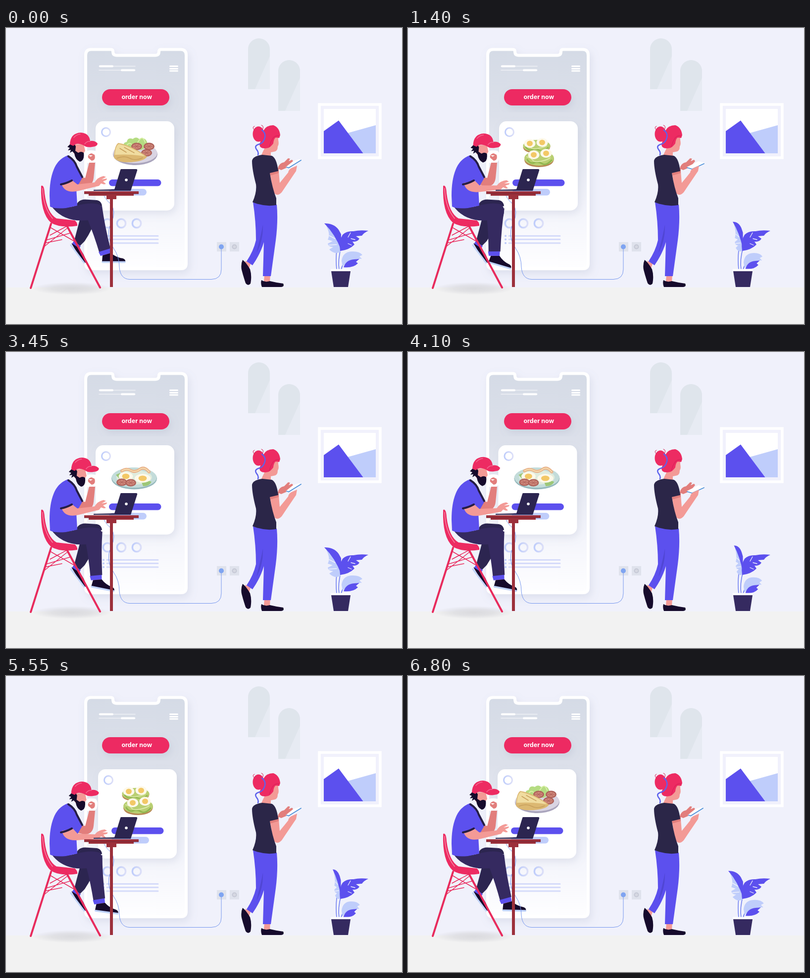
An HTML page for the animation above (6.85 s loop, 800x600 px).

```html
<!DOCTYPE html>
<html lang="en">
<head>
<meta charset="utf-8">
<title>Order now</title>
<style>
html, body { margin: 0; width: 100%; height: 100%; overflow: hidden; background: #f0f1fb; }
svg { display: block; width: 800px; height: 600px; }
.blue { fill: #5c50ee; } .pale { fill: #bfcdfb; } .red { fill: #ed2b62; }
.navy { fill: #2c2550; } .shirt { fill: #2b2648; } .pants { fill: #352a60; } .black { fill: #160b2c; }
.skin { fill: #f39a96; } .shade { fill: #e27e7c; } .white { fill: #fff; }
.line { fill: none; stroke-linecap: round; stroke-linejoin: round; }
</style>
</head>
<body>
<svg viewBox="0 0 800 600">
<defs>
  <linearGradient id="screen" x1="0" y1="0" x2="0" y2="1">
    <stop offset="0" stop-color="#d5dbe6"/><stop offset=".3" stop-color="#dce0ea"/>
    <stop offset=".72" stop-color="#f3f4fb"/><stop offset="1" stop-color="#fefeff"/>
  </linearGradient>
  <linearGradient id="ringFill"><stop stop-color="#bfcdfb"/><stop offset="1" stop-color="#dcdff8"/></linearGradient>
  <radialGradient id="ground"><stop stop-color="#dadade"/><stop offset=".5" stop-color="#dadade" stop-opacity=".7"/><stop offset="1" stop-color="#dadade" stop-opacity="0"/></radialGradient>
  <filter id="soft" x="-30%" y="-30%" width="160%" height="170%"><feDropShadow dx="4" dy="7" stdDeviation="8" flood-color="#8088a8" flood-opacity=".17"/></filter>
  <clipPath id="inside"><rect x="163" y="60" width="198" height="424"/></clipPath>
  <clipPath id="chat"><rect x="555" y="226" width="65" height="42"/></clipPath>
  <g id="arch">
    <path fill="#dfe5ec" d="M0 103V22A22 22 0 0 1 44 22V103Z"/>
    <path fill="#e7ebf3" d="M44 36V103H14Z"/>
  </g>
  <g id="frame">
    <rect class="white" x="181" y="189" width="159" height="181" rx="15" filter="url(#soft)"/>
    <circle class="line" cx="202" cy="211" r="8.5" stroke="url(#ringFill)" stroke-width="3"/>
    <rect class="blue" x="208" y="307" width="105.500" height="13.500" rx="6.700"/>
    <rect class="pale" x="208" y="326" width="76" height="13.500" rx="6.700"/>
  </g>
  <g id="egg">
    <ellipse rx="11.500" ry="9" fill="#fdf9ea"/>
    <ellipse rx="6" ry="5.500" fill="#f3c866"/>
  </g>
  <g id="tomato">
    <ellipse rx="11" ry="7.500" fill="#ad6159"/><ellipse rx="8.500" ry="5.300" fill="#cd8578"/>
    <path class="line" stroke="#ad6159" d="M-7 0H7M-4 -4L4 4M4 -4L-4 4"/>
  </g>
  <g id="toast">
    <path fill="#b88955" d="M-30 2Q-30 17 0 18Q30 17 30 0Z"/>
    <ellipse rx="30" ry="15" fill="#b9cf72"/>
    <path class="line" stroke="#90b64f" stroke-width="3" d="M-24 3Q-18 12 -10 9T6 11T25 4"/>
    <path class="line" stroke="#dce9a8" stroke-width="2" d="M-25 -3Q-16 -1 -13 4T4 6T22 -1"/>
  </g>
</defs>

<rect width="800" height="600" fill="#f0f1fb"/>
<rect y="526" width="800" height="74" fill="#f2f2f2"/>
<ellipse cx="133" cy="528" rx="80" ry="13" fill="url(#ground)"/>
<use href="#arch" x="489" y="21"/><use href="#arch" x="550" y="65"/>

<rect x="633" y="155" width="123" height="108" fill="#f1f1fc" stroke="#fff" stroke-width="5.500"/>
<rect class="white" x="642" y="164" width="105" height="90"/>
<path class="pale" d="M690 213L747 197V254H700Z"/>
<path class="blue" d="M642 209L672 187.500L721.500 254H642Z"/>

<!-- phone -->
<path filter="url(#soft)" fill="url(#screen)" stroke="#fff" stroke-width="6" d="M172 43.500H212Q216 43.500 216 48Q216 55.500 224 55.500H301Q309 55.500 309 48Q309 43.500 313 43.500H353Q364 43.500 364 55V477Q364 488 353 488H172Q161 488 161 477V55Q161 43.500 172 43.500Z"/>
<g class="line" stroke="#fff">
  <path stroke-width="1.500" opacity=".6" d="M188 77.500H261M188 85.500H261"/>
  <path stroke-width="4" d="M190 77.500H215M234 85.500H259"/>
  <path stroke-width="3" d="M331.500 77.500H346.500M331.500 82.500H346.500M331.500 87H346.500"/>
</g>
<rect class="red" x="194" y="124" width="136" height="33" rx="16.500" filter="url(#soft)"/>
<text x="264.300" y="144" text-anchor="middle" fill="#fff" font-family="Inter, 'Open Sans', sans-serif" font-weight="700" font-size="12.500">order now</text>

<g clip-path="url(#inside)">
  <g class="line" stroke="url(#ringFill)" stroke-width="3.500">
    <circle cx="205" cy="396" r="8.700"/><circle cx="233" cy="396" r="8.700"/><circle cx="264" cy="396" r="8.700"/>
  </g>
  <path class="line" stroke="#d5dbfa" stroke-width="3" d="M204 421.500H307M204 428.500H307M204 436H307"/>
  <path class="line" stroke="#bdcafb" stroke-width="4" d="M197 421.500h.1M197 428.500h.1M197 436h.1"/>

  <g id="card0"><use href="#frame"/>
    <ellipse cx="261" cy="256" rx="45" ry="22" fill="#aaa5bd"/>
    <ellipse cx="261" cy="253.500" rx="44.500" ry="20.500" fill="#d9d4e2"/>
    <path fill="#b5dc82" d="M239 245Q234 232 244 231Q246 221 256 225Q263 219 269 225Q280 221 284 229Q290 240 274 247Z"/>
    <path class="line" stroke="#d9f0a7" stroke-width="2" d="M243 240Q248 230 254 236T268 229T281 232"/>
    <use href="#tomato" x="264" y="240"/><use href="#tomato" x="289" y="240"/><use href="#tomato" x="284" y="253"/>
    <path fill="#dcb872" d="M218 262Q219 238 227 233Q255 238 285 261Q276 273 239 272Q222 270 218 262Z"/>
    <path fill="#f0dca0" d="M220 257Q221 239 228 235Q255 241 281 260Q250 255 220 257Z"/>
    <path class="line" stroke="#c79f5c" stroke-width="1.500" d="M224 264Q239 258 250 264T276 263M230 244L243 252M239 242L259 253"/>
  </g>
  <g id="card1"><use href="#frame"/>
    <use href="#toast" transform="translate(257 239) scale(.92 .82)"/>
    <use href="#egg" x="243" y="234"/><use href="#egg" x="268" y="232"/>
    <use href="#toast" transform="translate(262 264)"/>
    <use href="#egg" x="251" y="257"/><use href="#egg" x="276" y="254"/>
  </g>
  <g id="card2"><use href="#frame"/>
    <ellipse cx="259" cy="256.500" rx="46" ry="22" fill="#96b9bd"/>
    <ellipse cx="259" cy="254.500" rx="45.500" ry="20.500" fill="#c3dcda"/>
    <ellipse cx="259" cy="254" rx="36" ry="15" fill="#e0ecdd"/>
    <path class="line" stroke="#e9b28a" stroke-width="6" d="M234 241Q243 235 252 240T270 238T289 243"/>
    <path class="line" stroke="#f6dfb1" stroke-width="2" d="M234 241Q243 235 252 240T270 238T289 243"/>
    <path fill="#9cc777" d="M274 264Q282 258 294 263Q290 272 277 272ZM222 249L231 245L229 257Z"/>
    <use href="#egg" transform="translate(242 252) scale(1.250 1)"/><use href="#egg" transform="translate(276 256) scale(1.400 1)"/>
    <use href="#tomato" x="234" y="264"/><use href="#tomato" x="252" y="265"/>
  </g>
</g>

<!-- sockets -->
<g fill="#dfe2ec"><rect x="426" y="434" width="19" height="19"/><rect x="452" y="434" width="19" height="19"/></g>
<circle cx="461.500" cy="443.500" r="5" fill="#c5c8d5"/><circle cx="461.500" cy="443.500" r="3" fill="#d6d8e2"/>

<!-- plant -->
<path class="line" stroke="#6c7cf0" stroke-width="1.500" d="M668 490Q666 470 668 450M673 490Q670 470 677 445M677 490Q680 475 695 468"/>
<g id="leaf">
  <path class="pale" d="M647 401Q656 418 650 429L660 432L650 437Q651 444 661 444L653 449Q664 460 676 454Q678 432 671 415Z"/>
  <path class="line" stroke="#f0f1fb" stroke-width="1.500" d="M653 421L665 427M653 440L668 439M656 409L664 415"/>
  <path class="blue" d="M643 396Q663 396 672 409L677 418V450Q665 418 643 396Z"/>
</g>
<path class="blue" d="M675 452Q672 431 680 419Q688 411 702 412Q715 409 732 411Q723 415 719 421L707 422L714 427Q710 434 700 433L704 439Q693 450 675 452Z"/>
<path class="line" stroke="#f0f1fb" stroke-width="1.300" d="M696 415L691 424M705 429L697 427M698 440L691 437"/>
<g id="sprig">
  <path class="pale" d="M678 472Q680 454 698 453Q714 452 720 460L714 463L719 468Q700 466 680 483Z"/>
  <path class="blue" d="M682 485Q687 470 703 469L714 468L707 474L711 477Q701 487 682 485Z"/>
</g>
<path class="pants" d="M657 493H696L691 525H662Z"/><path class="white" d="M656 488.500H696V493H656Z"/>

<!-- woman -->
<g clip-path="url(#chat)"><rect id="pill" class="blue" x="563.500" width="47.500" height="23" rx="11.500"/></g>
<path class="skin" d="M484 472L494 478L491 488L481 480ZM522 500H534L533 514H521ZM515 259L528 232L542 221Q551 219 550 227Q552 236 549 240Q549 251 540 251L535 252L535 259Z"/>
<path class="black" d="M478 470Q485 475 493 489Q497 502 494 518Q489 524 484 517Q479 502 476 490Q474 479 478 470ZM516 511Q523 516 533 513Q545 516 560 518Q563 524 556 525H517Q514 518 516 511Z"/>
<path class="blue" d="M499 353Q522 362 547 358Q550 390 545 430L535 503H519L521 434Q514 458 498 481L486 473Q500 452 505 430Q505 392 499 353Z"/>
<path fill="#5046d4" d="M519 399Q520 432 506 455Q514 425 519 399Z"/>
<path class="shade" d="M549 285Q551 274 562 272L570 264L574 265L571 270L578 267L580 270L570 282L556 288Z"/>
<path class="white" id="device"/><path id="edge" class="line" stroke="#4b8fd8" stroke-width="1.800"/>
<path class="skin" d="M533 293L551 290L553 314L570 293Q571 286 579 283L588 279L586 290L557 333Q548 343 540 333Z"/>
<path class="shade" d="M532 288L551 284V294L534 299Z"/>
<path class="shirt" d="M497 269Q499 259 518 257L537 259Q547 264 550 290L533 294Q538 325 546 345V359Q522 363 498 353Q507 333 505 317Q497 287 497 269Z"/>
<path class="red" d="M520 208Q526 197 540 197Q552 201 554 217L552 223L545 222Q541 224 540 234Q535 241 530 243Q513 247 512 236Q517 223 520 208Z"/>
<ellipse class="red" cx="510" cy="215" rx="11.500" ry="15.500"/>
<path class="line" stroke="#d31f55" d="M502 207Q496 201 502 199M518 207Q522 198 516 197M532 240Q535 229 540 222Q547 216 552 219"/>
<path class="line" stroke="#5c62ed" stroke-width="2.500" d="M517 207Q525 213 523 222Q520 234 510 236Q501 239 506 246Q511 252 509 257"/>

<!-- chair -->
<path class="red" d="M71 320Q77 317 78 335Q83 375 102 386L139 390Q145 395 144 401Q110 406 91 395Q69 375 71 320Z"/>
<path class="line" stroke="#f58aa7" stroke-width="1.500" d="M74 325Q75 363 94 386"/>

<!-- seated man -->
<path class="white" d="M159 253Q164 246 181 249Q188 255 183 269Q175 279 163 273Z"/>
<path class="shade" d="M143 300L160 304L168 273L180 273L177 304Q175 321 159 321L140 317ZM166 263Q164 256 173 254L179 257Q182 268 173 269Z"/>
<path class="white" d="M167 258L175 258L171 261Z"/>
<path class="navy" d="M150 385L184 380Q175 408 159 432L149 442L137 434Z"/>
<path class="blue" d="M137 432L151 442L147 448L133 438Z"/>
<path class="black" d="M132 436L146 445Q155 454 159 464L161 476L154 473Z"/>
<path class="line" stroke="#bfd3fb" stroke-width="3" d="M131 440L158 476"/>
<path class="navy" d="M141 364Q143 348 160 347.500L184 349Q193 351 194 361Z"/>
<g id="shin">
  <path class="pants" d="M156 366L194 361Q199 399 211 447L189 457Q178 420 166 391Z"/>
  <path class="skin" d="M193 455L210 451L213 462L196 464Z"/>
  <path class="blue" d="M187 454L210 447L212 456L191 462Z"/>
  <path class="black" d="M195 461L212 456Q222 465 236 467Q242 469 241 474H194Z"/>
  <path class="line" stroke="#bfd3fb" stroke-width="3.500" d="M195 474.500H240"/>
</g>
<path class="pants" d="M91 360Q115 368 142 360Q174 352 189 358Q198 367 191 385Q176 391 143 390Q109 386 91 360Z"/>
<path class="blue" d="M125 258Q104 266 96 288Q88 308 88 340L89 362Q98 367 121 365L144 360L142 325L154 304Q147 276 126 259Z"/>
<path class="line" stroke="#251d45" stroke-width="4" d="M126 260Q139 268 143 281L154 302"/>
<g id="arm">
  <path class="skin" d="M112 316L134 309L144 317L179 313Q184 303 197 300L202 302L193 307L204 305L203 308L196 311L202 316L198 317L192 315L188 320L147 330Q119 337 112 316Z"/>
</g>
<path class="line" stroke="#251d45" stroke-width="4" d="M111 317Q122 315 133 309"/>
<g id="head">
  <path class="skin" d="M137 236L157 235L160 249L154 258L143 260L136 253Z"/>
  <path class="black" d="M130 235L138 235L141 240L140 249L146 253Q152 249 157 253Q159 269 149 271Q140 267 138 254L134 250L129 253L131 247L125 248L129 243L124 241Z"/>
  <path class="red" d="M129 236Q130 213 151 212Q168 213 170 229Q180 228 185 234Q185 240 174 241Q163 243 157 238Q143 231 136 239Z"/>
  <path class="line" stroke="#f36a91" stroke-width="1.500" d="M137 222Q142 216 150 215M159 235Q164 229 170 230"/>
</g>

<g class="line" stroke="#e82b5d" stroke-width="4">
  <path d="M91 397L50 527M122 399L190 526"/>
  <path stroke-width="1.500" d="M89 404L141 434M81 430L132 415M76 444L126 404M89 420L126 400M78 436L113 429"/>
</g>
<path class="line" stroke="#7697ee" d="M198 340Q203 350 211 356Q224 372 212 396Q200 421 217 446Q229 463 229 485Q231 509 250 509.500H415Q435 509 435 489V444"/>
<circle cx="435" cy="443.500" r="5" fill="#7fa4f1"/>

<!-- table and laptop -->
<path fill="#9c303b" d="M158 331H268V336H158ZM167 336H258V340H167ZM203 340H223V347H203ZM210 347H216V525H210Z"/>
<path fill="#7d2431" d="M158 335H268V336.500H158Z"/>
<path class="navy" d="M233 286H263Q266 286 265 289L252 330H177V328L219 327L231 288Q231 286 233 286Z"/>
<circle class="white" cx="243" cy="308" r="2.800"/>
</svg>
<script>
const $ = id => document.getElementById(id);
const LOOP = 6850, STEP = 50, GAP = 240;

// Smooth curve through [time, value] pairs, without overshoot.
function curve(keys) {
  const rate = i => (keys[i + 1][1] - keys[i][1]) / (keys[i + 1][0] - keys[i][0]);
  const slope = keys.map((_, i) => {
    if (!i || i === keys.length - 1) return 0;
    const a = rate(i - 1), b = rate(i);
    return a * b > 0 ? 2 * a * b / (a + b) : 0;
  });
  return t => {
    if (t <= keys[0][0]) return keys[0][1];
    const i = keys.findIndex(k => k[0] >= t) - 1;
    if (i < 0) return keys[keys.length - 1][1];
    const [t0, a] = keys[i], [t1, b] = keys[i + 1], d = t1 - t0, u = (t - t0) / d;
    const s = u * u * (3 - 2 * u), v = 1 - u;
    return a + (b - a) * s + d * u * v * (slope[i] * v - slope[i + 1] * u);
  };
}

const slide = curve([[0, 0], [250, 6], [400, 20], [500, 41], [600, 150], [700, GAP - 9], [800, GAP - 5], [900, GAP - 3], [1150, GAP]]);
const shin = curve([[0, 0], [50, 1.5], [650, 25], [1150, 3], [1300, 7.5], [1400, 16.5], [1750, 32], [2250, 34], [2450, 25.5], [3000, 4], [3425, 11.5]]);
const arm = curve([[0, 0], [300, 0], [550, 8], [800, 2], [1150, 8], [1300, 9], [1400, 7], [1750, 1], [2250, 7.5], [2450, 9], [2900, 2], [3150, 6], [3400, 0]]);
const leafTip = curve([[0, 643], [50, 647], [350, 660], [800, 644], [1300, 660], [1400, 656], [1800, 643], [2250, 650], [2450, 656], [2650, 660], [3050, 648], [3400, 643]]);
const pillTop = curve([[1950, 270], [2250, 230], [2450, 220], [2750, 202]]);

const set = (id, value) => $(id).setAttribute("transform", value);

function draw(time) {
  const t = Math.floor(time % LOOP / STEP) * STEP;
  const m = Math.min(t, LOOP - t); // plays forward, then back

  const shift = slide(m - 500) + slide(m - 1750);
  for (let i = 0; i < 3; i++) set("card" + i, `translate(${i * GAP - shift} 0)`);

  const nod = (1 - Math.cos(m / LOOP * 6 * Math.PI)) / 2;
  set("head", `translate(${2.8 * nod} ${2 * nod})`);
  set("shin", `rotate(${shin(m)} 178 366)`);
  set("arm", `rotate(${arm(m)} 128 321)`);

  const k = (676 - leafTip(m)) / 33;
  set("leaf", `translate(676 ${-8 * (1 - k)}) scale(${k} 1) translate(-676 0)`);
  set("sprig", `translate(678 0) scale(${.76 + .24 * k} 1) translate(-678 ${8 * (1 - k)})`);

  $("pill").setAttribute("y", pillTop(m));
  const tilted = m > 1350 && m < 1900 || m > 2350 && m < 2900;
  $("device").setAttribute("d", tilted ? "M563 282L587 270L599 274L574 286Z" : "M565 282L580 270L592 266L597 267L571 284Z");
  $("edge").setAttribute("d", tilted ? "M564 283L574 286L598 275" : "M567 282L571 283.5L596 268");
}

function tick(now) {
  draw(now);
  requestAnimationFrame(tick);
}
draw(0);
requestAnimationFrame(tick);
</script>
</body>
</html>
```
